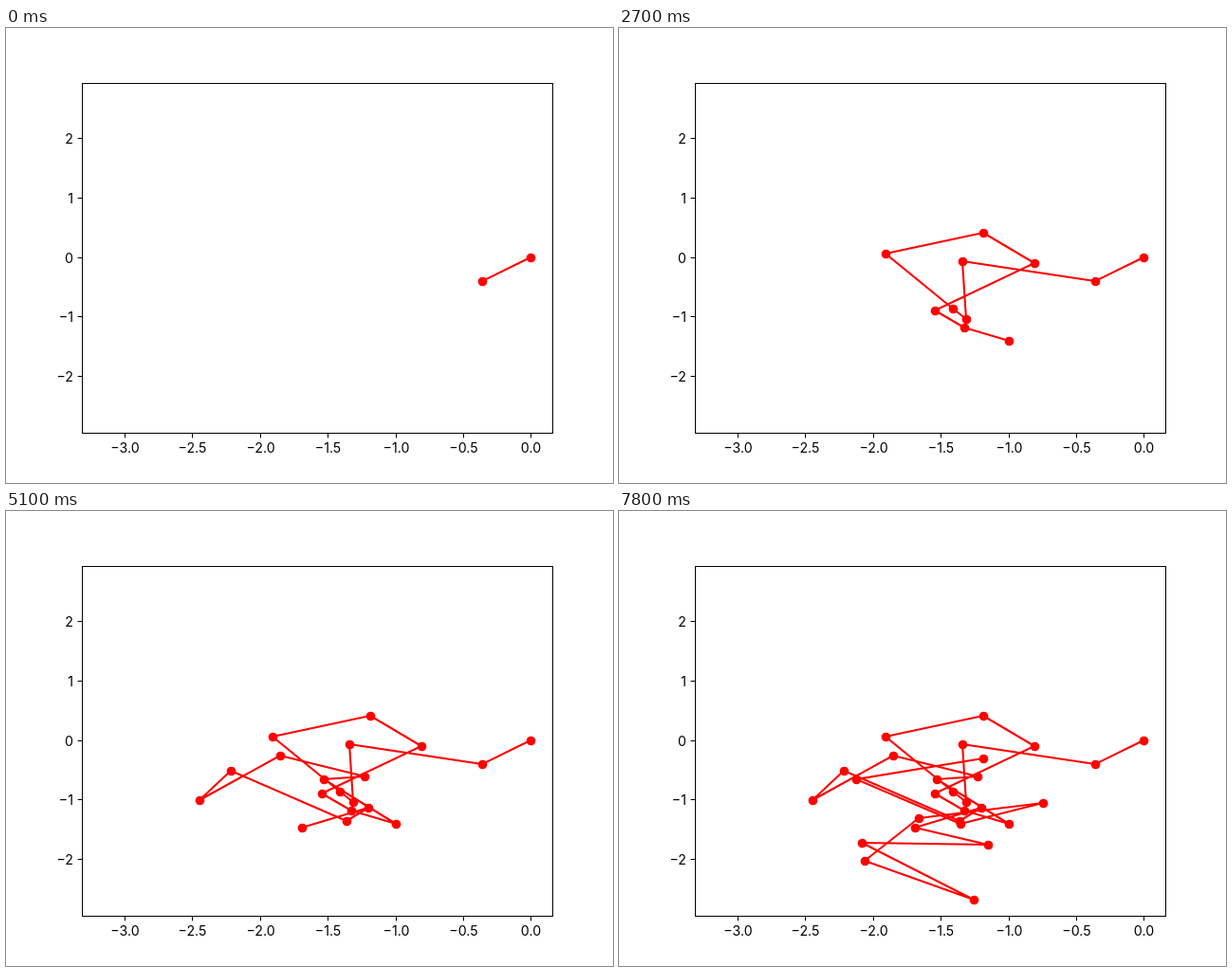
Recreate the animation shown at these times as an HTML page. Size 640 px wide and 480 px high, loop 8000 ms.

```html
<!DOCTYPE html>
<html lang="en">
<head>
<meta charset="utf-8">
<title>Random walk</title>
<style>
  html, body { margin: 0; width: 100%; height: 100%; overflow: hidden; background: #fff; }
  svg { display: block; width: 640px; height: 480px; }
  text { font: 14.2px Inter, "Noto Sans", sans-serif; }
  #axes { fill: none; stroke: #000; stroke-width: 1; }
  #walk { fill: none; stroke: #f00; stroke-width: 2.08; stroke-linejoin: round; stroke-linecap: square; }
  #dots { fill: #f00; }
</style>
</head>
<body>
<svg viewBox="0 0 640 480">
  <polyline id="walk"/>
  <g id="dots"></g>
  <g id="axes"><rect x="80.5" y="58.5" width="496" height="369"/></g>
  <g id="labels"></g>
</svg>
<script>
const STEP = 300, LOOP = 8000;

// Corners of the walk; one more is revealed at each step.
const walk = [
  [553, 242], [502, 267], [362, 246], [366, 307], [352, 296], [281, 238],
  [384, 216], [438, 248], [333, 298], [364, 316], [411, 330],
  [335, 283], [378, 280], [289, 258], [204, 305], [237, 274],
  [359, 327], [382, 313], [312, 334], [389, 352], [256, 350],
  [374, 410], [259, 369], [316, 324],
  [447, 308], [360, 330], [250, 283], [384, 261]
];

const $ = id => document.getElementById(id);
const snap = v => Math.round(v) + 0.5;
const toX = v => 553.45 + v * 142.8;
const toY = v => 241.6 - v * 62.6;
const label = (v, digits) => v.toFixed(digits).replace('-', '\u2212');

function add(parent, tag, attrs, text) {
  const el = document.createElementNS('http://www.w3.org/2000/svg', tag);
  for (const k in attrs) el.setAttribute(k, attrs[k]);
  if (text) el.textContent = text;
  return $(parent).appendChild(el);
}

for (let v = -3; v <= 0; v += 0.5) {
  const x = snap(toX(v));
  add('axes', 'path', { d: `M${x} 427.5v4.86` });
  add('labels', 'text', { x, y: 448, 'text-anchor': 'middle' }, label(v, 1));
}
for (let v = -2; v <= 2; v++) {
  const y = snap(toY(v));
  add('axes', 'path', { d: `M80.5 ${y}h-4.86` });
  add('labels', 'text', { x: 71, y: y + 5, 'text-anchor': 'end' }, label(v, 0));
}

// Dots sit on pixel centres, lines do not.
const dots = walk.map(([x, y]) => add('dots', 'circle', { cx: snap(x), cy: snap(y), r: 4.86 }));
let shown = 0;

function draw(time) {
  const count = Math.min(walk.length, 2 + Math.floor((time % LOOP) / STEP));
  if (count === shown) return;
  shown = count;
  $('walk').setAttribute('points', walk.slice(0, count).join(' '));
  dots.forEach((dot, i) => dot.setAttribute('visibility', i < count ? 'visible' : 'hidden'));
}

draw(0);
let start;
requestAnimationFrame(function tick(now) {
  start ??= now;
  draw(now - start);
  requestAnimationFrame(tick);
});
</script>
</body>
</html>
```
